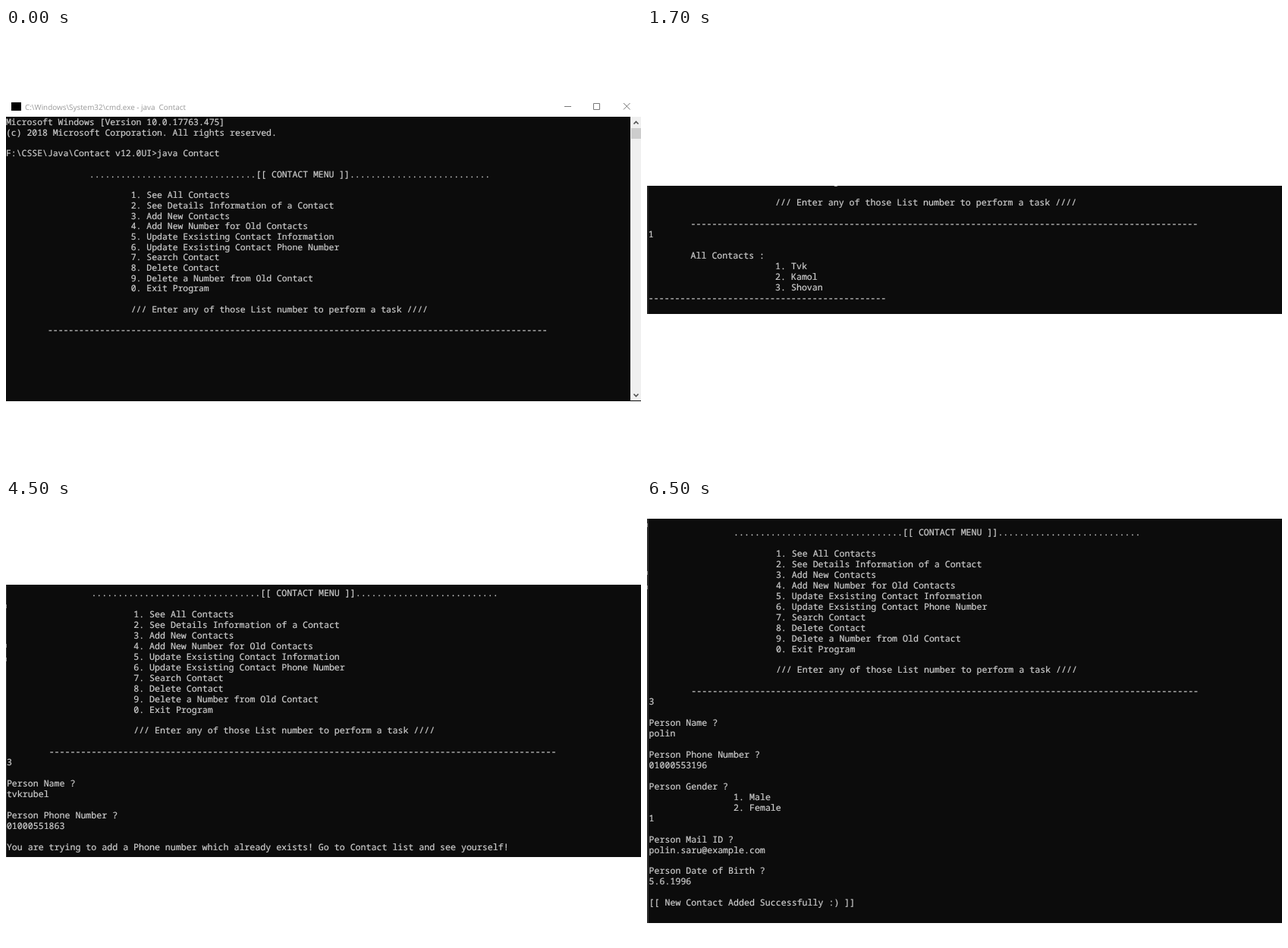
Animation, 837 px wide and 584 px high, one loop 8000 ms. Source, as an HTML page:

```html
<!DOCTYPE html>
<html lang="en">
<head>
<meta charset="utf-8">
<title>Contact menu</title>
<style>
  html, body { margin: 0; width: 100%; height: 100%; overflow: hidden; background: #fff; }
  #stage { position: relative; width: 100%; height: 100%; overflow: hidden; }
  svg { position: absolute; left: 0; top: 0; width: 100%; height: 100%; background: #fff;
        animation: 8s step-end infinite; }
  text { text-rendering: geometricPrecision; white-space: pre; }
  .con { font-family: "Noto Sans Mono", "DejaVu Sans Mono", monospace;
         fill: #ccc; stroke: #ccc; stroke-width: .22; }
  .cap { font: 9.9px "Open Sans", "Noto Sans", sans-serif; fill: #999; }
  .btn { fill: none; stroke: #777; stroke-width: 1; }
  .arrow { fill: none; stroke: #505050; stroke-width: 1.6; }

  /* Each scene covers the ones before it until the loop restarts. */
  svg:nth-child(2) { animation-name: list; }
  svg:nth-child(3) { animation-name: details; }
  svg:nth-child(4) { animation-name: refused; }
  svg:nth-child(5) { animation-name: added; }
  @keyframes list    { 0% { visibility: hidden; } 6.25%, 100%  { visibility: visible; } }
  @keyframes details { 0% { visibility: hidden; } 31.25%, 100% { visibility: visible; } }
  @keyframes refused { 0% { visibility: hidden; } 56.25%, 100% { visibility: visible; } }
  @keyframes added   { 0% { visibility: hidden; } 81.25%, 100% { visibility: visible; } }
</style>
</head>
<body>
<div id="stage"></div>
<script>
const NS = 'http://www.w3.org/2000/svg';
const stage = document.getElementById('stage');

function add(parent, tag, attrs, text) {
  const el = document.createElementNS(NS, tag);
  for (const k in attrs) el.setAttribute(k, attrs[k]);
  if (text) el.textContent = text;
  parent.appendChild(el);
  return el;
}

const box = (svg, x, y, width, height, fill) => add(svg, 'rect', { x, y, width, height, fill });
const at = (col, ...lines) => lines.map(s => ' '.repeat(col) + s);

const prompt = [
  ...at(24, '0. Exit Program', '', '/// Enter any of those List number to perform a task ////'),
  '', ...at(8, '-'.repeat(96))
];
const menu = [
  ...at(16, '.'.repeat(32) + '[[ CONTACT MENU ]]' + '.'.repeat(27)),
  '',
  ...at(24,
    '1. See All Contacts',
    '2. See Details Information of a Contact',
    '3. Add New Contacts',
    '4. Add New Number for Old Contacts',
    '5. Update Exsisting Contact Information',
    '6. Update Exsisting Contact Phone Number',
    '7. Search Contact',
    '8. Delete Contact',
    '9. Delete a Number from Old Contact'),
  ...prompt
];
const contacts = [
  '', ...at(8, 'All Contacts :'),
  ...at(24, '1. Tvk', '2. Kamol', '3. Shovan'),
  '-'.repeat(45)
];

// One console picture: panel from top to bottom, first baseline at y, cell size cw by lh.
function scene({ top, bottom, x, y, lines, cw = 6.97, lh = 13.945, edge, marks = [] }) {
  const svg = add(stage, 'svg', { viewBox: '0 0 837 584' });
  const id = 'clip' + stage.children.length;
  const clip = add(svg, 'clipPath', { id });
  box(clip, 0, top, 837, bottom - top);
  box(svg, 0, top, 837, bottom - top, '#0c0c0c');
  if (edge) box(svg, 0, top, edge, bottom - top, '#333');
  for (const m of marks) box(svg, 0, m, 1, 5, '#999');
  const g = add(svg, 'g', { class: 'con', 'font-size': cw / 0.6, 'clip-path': `url(#${id})` });
  lines.forEach((line, i) => {
    const s = line.trimStart();
    if (s) add(g, 'text', { x: x + (line.length - s.length) * cw, y: y + i * lh }, s);
  });
  return svg;
}

const win = scene({
  top: 117, bottom: 492, x: 0, y: 128.2, cw: 6.865, lh: 13.7,
  lines: [
    'Microsoft Windows [Version 10.0.17763.475]',
    '(c) 2018 Microsoft Corporation. All rights reserved.',
    '', 'F:\\CSSE\\Java\\Contact v12.0UI>java Contact', '',
    ...menu
  ]
});
box(win, 7, 98, 13, 11, '#000');
add(win, 'text', { class: 'cap', x: 25, y: 107.5 },
  'C:\\Windows\\System32\\cmd.exe - java\u00a0 Contact');
add(win, 'path', { class: 'btn', d: 'M736 103.5h9M774.5 99.5h8v8h-8zM814 99l8.5 8.5M822.5 99l-8.5 8.5' });
box(win, 823, 117, 14, 374, '#f0f0f0');
box(win, 824, 132, 13, 14, '#cdcdcd');
add(win, 'path', { class: 'arrow', d: 'M827.5 126.5l3-3 3 3M827.5 482.5l3 3 3-3' });

scene({
  top: 208, bottom: 377, x: 1.8, y: 206.3, edge: 1.5,
  lines: [...prompt, '1', ...contacts]
});

scene({
  top: 39, bottom: 546, x: 0.9, y: 60.2, edge: 1, marks: [41, 46, 75, 85, 138, 156],
  lines: [
    ...menu, '2', ...contacts,
    'Select the list NO. from ALL Contacts to view details Information.......',
    '1', '', 'Contact Infromation :', '',
    ...at(8, 'Contact Name : Tvk', 'Contact Number :'),
    ...at(16, '1. 01000551863', '2. 01000557420'),
    ...at(8, 'Contact Gender : Male', 'Contact Mail : tvk.rub@example.com',
      'Contact Date of Birth : 28/1/1995')
  ]
});

scene({
  top: 113, bottom: 472, x: 0.9, y: 128.2, edge: 1, marks: [139, 191, 209],
  lines: [
    ...menu, '3', '', 'Person Name ?', 'tvkrubel', '',
    'Person Phone Number ?', '01000551863', '',
    'You are trying to add a Phone number which already exists! Go to Contact list and see yourself!'
  ]
});

scene({
  top: 26, bottom: 559, x: 2.6, y: 48.2, edge: 2, marks: [32, 95, 114],
  lines: [
    ...menu, '3', '', 'Person Name ?', 'polin', '',
    'Person Phone Number ?', '01000553196', '',
    'Person Gender ?', ...at(16, '1. Male', '2. Female'), '1', '',
    'Person Mail ID ?', 'polin.saru@example.com', '',
    'Person Date of Birth ?', '5.6.1996', '',
    '[[ New Contact Added Successfully :) ]]'
  ]
});
</script>
</body>
</html>
```
